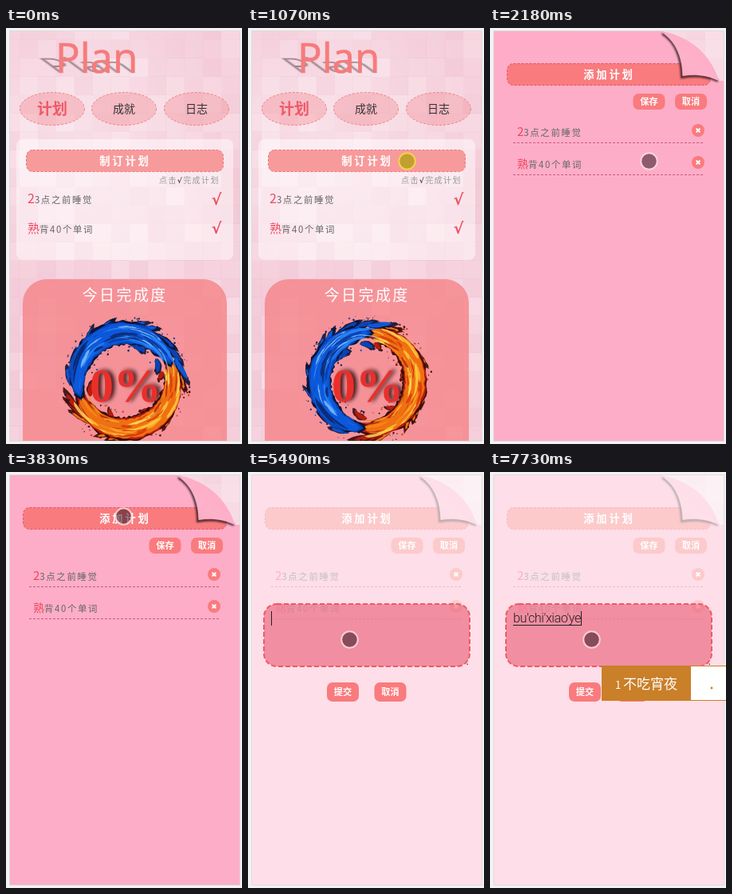
Write an HTML page that moves like this. It is 296 by 520 pixels and loops after 8000 ms.

```html
<!DOCTYPE html>
<html lang="zh">
<head>
<meta charset="utf-8">
<style>
html, body { margin: 0; width: 100%; height: 100%; overflow: hidden; background: #f3f3f3; }
svg { display: block; width: 296px; height: 520px; }
text { font-family: "Noto Sans CJK SC", "Noto Sans CJK", "Open Sans", sans-serif; white-space: pre; }
.pinyin { font: 300 16.3px Roboto, "Open Sans", sans-serif; letter-spacing: -.45px; }
.score { font: bold 60px "Liberation Serif", serif; }
.title { font: 500 51px "Open Sans", "Noto Sans", sans-serif; }
.tick { font-family: "DejaVu Sans", sans-serif; font-weight: 700; }
</style>
</head>
<body>
<svg id="stage" viewBox="0 0 296 520" xmlns="http://www.w3.org/2000/svg"></svg>
<script>
const LOOP = 8000;
const CORAL = '#f97b7e';
const stage = document.getElementById('stage');

let seed = 7;
const rand = (lo = 0, hi = 1) => {
  seed = (seed * 16807) % 2147483647;
  return lo + (hi - lo) * seed / 2147483647;
};

const attrs = o => Object.entries(o).map(([k, v]) => `${k}="${v}"`).join(' ');
const rect = (x, y, w, h, r, fill, more = {}) =>
  `<rect ${attrs({ x, y, width: w, height: h, rx: r, fill, ...more })}/>`;
const label = (s, x, y, size, fill, more = {}) =>
  `<text ${attrs({ x, y, 'font-size': size, fill, ...more })}>${s}</text>`;
// Centred text; the trailing letter space is compensated
const mid = (s, x, y, size, fill, gap = 0, weight = 400) =>
  label(s, x + gap / 2, y, size, fill, { 'text-anchor': 'middle', 'letter-spacing': gap, 'font-weight': weight });

function tiles() {
  const tones = ['#f8dbe4', '#f5cedb', '#f6d3df', '#f3c9d7', '#f9dfe8', '#f5cfdb'];
  let out = rect(5, 4, 288, 512, 0, '#f5cfdc');
  for (let y = -8; y < 520; y += 23)
    for (let x = -6; x < 296; x += 23) {
      const big = rand() < .18 ? 46 : 23;
      const tone = tones[Math.floor(rand() * tones.length)];
      out += rect(x, y, big, 23, 0, tone, { 'fill-opacity': rand(.45, .9).toFixed(2) });
      out += `<path d="M${x} ${y + 22.5}h${big}v-22" fill="none" stroke="#e9b9c9" stroke-opacity="${rand(.05, .35).toFixed(2)}"/>`;
    }
  return out + rect(5, 4, 288, 512, 0, 'url(#glow)');
}

// Ragged crescent between two angles, thin at both ends; drift spirals it outwards
function crescent(a0, a1, inner, outer, fill, rough = 0, opacity = 1, drift = 0) {
  const n = Math.max(8, Math.round(Math.abs(a1 - a0) / 4));
  const centre = (inner + outer) / 2, half = (outer - inner) / 2;
  const edge = side => Array.from({ length: n + 1 }, (_, i) => {
    const u = i / n, a = (a0 + (a1 - a0) * u) * Math.PI / 180;
    const taper = Math.pow(Math.sin(Math.PI * u), .45);
    const r = centre + drift * u * u + side * half * taper + rand(-rough, rough);
    return `${(r * Math.cos(a)).toFixed(1)} ${(r * Math.sin(a)).toFixed(1)}`;
  });
  const points = [...edge(1), ...edge(-1).reverse()];
  return `<path d="M${points.join('L')}Z" fill="${fill}" fill-opacity="${opacity}"/>`;
}

function element(a0, a1, base, streaks, specks) {
  let out = '';
  for (let i = 0; i < 70; i++) {
    const a = rand(a0 - 8, a1 + 8) * Math.PI / 180;
    const r = rand() < .65 ? rand(73, 82) : rand(38, 46);
    out += `<circle cx="${(r * Math.cos(a)).toFixed(1)}" cy="${(r * Math.sin(a)).toFixed(1)}" r="${rand(.4, 1.4).toFixed(1)}" fill="${specks[i % specks.length]}"/>`;
  }
  // Splashes: outer tongues and inner curls
  for (let i = 0; i < 16; i++) {
    const a = rand(a0, a1), sweep = rand(14, 32);
    const outside = i % 4 > 0, r = outside ? 69 : 47;
    const drift = outside ? rand(6, 13) : rand(-9, -4);
    out += crescent(a, a + sweep, r - 4, r + 4, base[0], .7, .9, drift);
    out += crescent(a, a + sweep * .8, r - 3.2, r + 2.8, base[1 + i % 2], .4, 1, drift * .75);
  }
  base.forEach((c, i) => out += crescent(a0 - 10 + i * 4, a1 + 10 - i * 4, 45 + i * 1.6, 75 - i * 1.6, c, 1.8 - i * .4));
  for (let i = 0; i < 48; i++) {
    const start = rand(a0 + 2, a1 - 22), r = rand(49, 69);
    out += crescent(start, start + rand(14, 48), r, r + rand(.8, 4.2), streaks[i % streaks.length], .4, .8, rand(-3, 3));
  }
  return out;
}

function ring() {
  const fire = element(-22, 158, ['#3a0c08', '#b81c0c', '#ee7012'],
    ['#ffb52a', '#ffe268', '#b8200c', '#ffc83c', '#f58a18', '#d8340c'], ['#7d1a10', '#e0451a', '#30100c']);
  const ice = element(-194, -26, ['#0b1538', '#0a44b4', '#0c58da'],
    ['#2f8cff', '#0a3aa4', '#1166e6', '#83c4ff', '#0b4cc4', '#0a2468'], ['#11225a', '#1c2233', '#1a4fae']);
  return fire + ice;
}

const pillButton = (s, x, y, h) =>
  rect(x, y, 40, h, 7, CORAL) + mid(s, x + 20, y + h / 2 + 4, 11.2, '#fff', 0, 700);

const entry = (first, rest, x, y, size) =>
  `<text x="${x}" y="${y}" font-size="11.4" letter-spacing="1.65" fill="#666"><tspan font-size="${size}" letter-spacing="0" fill="#f0455f">${first}</tspan>${rest}</text>`;

const tickMark = y =>
  `<text class="tick" x="264" y="${y}" font-size="19" text-anchor="middle" fill="#ee5060">√</text>`;

function homePage() {
  const tabs = [['计划', 58], ['成就', 148], ['日志', 239]].map(([s, x], i) =>
    `<ellipse cx="${x}" cy="101" rx="40.5" ry="20.5" fill="#f28a92" fill-opacity=".38" stroke="#f28080" stroke-dasharray="3 2"/>` +
    (i ? mid(s, x, 106, 14, '#333') : mid(s, x, 108, 19, '#ee5a68', 0, 700))).join('');
  return `<use href="#tiles"/>
    <g clip-path="url(#card)">
    <text class="title" transform="matrix(1 0 .68 .5 62 56)" fill="#55454c" fill-opacity=".55" filter="url(#soft)">Plan</text>
    <text class="title" x="62" y="55.5" fill="#f67b7b" stroke="#f67b7b" stroke-width=".7">Plan</text>
    ${tabs}
    ${rect(13, 139, 272, 151, 8, '#fff', { 'fill-opacity': .45 })}
    ${rect(25.5, 152.5, 247, 27, 8, '#f79a9b', { stroke: '#e97478', 'stroke-dasharray': '3 2' })}
    ${mid('制订计划', 148, 171, 13.3, '#fff', 2.8, 700)}
    <text x="192" y="194" font-size="10" letter-spacing="1.4" fill="#999">点击<tspan class="tick" font-size="9" fill="#444">√</tspan>完成计划</text>
    ${entry('2', '3点之前睡觉', 27, 219, 16)}
    ${entry('熟', '背40个单词', 27, 256, 15)}
    ${tickMark(221)}${tickMark(257)}
    ${rect(21, 314, 256, 240, 30, '#f6858a', { 'fill-opacity': .82 })}
    ${mid('今日完成度', 148, 340.5, 19, '#fff', 2.4)}
    <g id="ring">${ring()}</g>
    <text class="score" x="105" y="467" fill="#1c0808" fill-opacity=".8" filter="url(#blur)" transform="translate(4 -1)">0%</text>
    <text class="score" x="105" y="467" fill="#ea2f2b">0%</text>
    </g>`;
}

function planPage() {
  const rows = [128, 168].map(y =>
    `<path d="M29 ${y + 15.5}H269" stroke="#d0587a" stroke-dasharray="3 2"/>
     <circle cx="261" cy="${y}" r="8" fill="${CORAL}"/>
     <path d="M258.6 ${y - 2.4}l4.8 4.8m0 -4.8l-4.8 4.8" stroke="#fff" stroke-width="2"/>`).join('');
  return `${rect(5, 4, 288, 512, 0, '#fdadc7')}
    <g clip-path="url(#corner)"><use href="#tiles"/>${rect(210, 4, 83, 64, 0, '#fff', { 'fill-opacity': .2 })}</g>
    ${rect(21.5, 44.5, 255, 27, 8, CORAL, { stroke: '#e5536a', 'stroke-dasharray': '3 2' })}
    ${mid('添加计划', 148, 63, 13.3, '#fff', 2.8, 700)}
    <path d="M216 7C234 18 240.5 40 240.5 61.5C255 58.5 272 60.5 286 66" fill="none" stroke="#2a1a20" stroke-opacity=".85" stroke-width="3" filter="url(#soft)"/>
    <path d="M215 5C235 18 241.5 40 241.5 60C256 57 273 59 287 66C277 33 250 10 215 5Z" fill="url(#flap)"/>
    ${pillButton('保存', 179.5, 82, 20)}${pillButton('取消', 232, 82, 20)}
    ${rows}
    ${entry('2', '3点之前睡觉', 34, 135, 15)}
    ${entry('熟', '背40个单词', 34, 175, 14)}`;
}

function dialog() {
  return `${rect(5, 4, 288, 512, 0, '#fff', { 'fill-opacity': .6 })}
    ${pillButton('提交', 99, 263, 24)}${pillButton('取消', 158.5, 263, 24)}
    ${rect(20, 165, 258, 78, 16, '#ea5a74', { 'fill-opacity': .6, stroke: '#ee5a66', 'stroke-width': 2, 'stroke-dasharray': '6 3' })}
    ${rect(274.5, 239.5, 1.5, 1.5, 0, '#555')}
    <text id="typed" class="pinyin" x="29" y="188" fill="#222"></text>
    <path id="under" stroke="#222"/><path id="caret" stroke="#222"/>
    <g id="choices"></g>`;
}

stage.innerHTML = `<defs>
    <radialGradient id="glow" gradientUnits="userSpaceOnUse" cx="80" cy="130" r="210">
      <stop stop-color="#fff" stop-opacity=".32"/><stop offset="1" stop-color="#fff" stop-opacity="0"/>
    </radialGradient>
    <linearGradient id="flap" x1="0" y1="1" x2="1" y2="0">
      <stop offset=".1" stop-color="#f9a4bf"/><stop offset=".4" stop-color="#fdb2ca"/><stop offset=".75" stop-color="#ffabc6"/>
    </linearGradient>
    <g id="tiles">${tiles()}</g>
    <clipPath id="card">${rect(5, 4, 288, 512, 0, '#000')}</clipPath>
    <clipPath id="corner"><path d="M215 4C250 10 277 33 287 66H293V4Z"/></clipPath>
    <filter id="soft"><feGaussianBlur stdDeviation=".9"/></filter>
    <filter id="blur"><feGaussianBlur stdDeviation="2.6"/></filter>
  </defs>
  ${rect(0, 0, 296, 520, 0, '#f3f3f3')}
  <g clip-path="url(#card)"><g id="home">${homePage()}</g><g id="plan">${planPage()}</g></g>
  ${rect(4.5, 3.5, 289, 513, 0, 'none', { stroke: '#ddd' })}
  <g id="dialog">${dialog()}</g>
  <g id="pointer"><circle id="dot" r="9.5"/><circle id="halo" r="10.3" fill="none" stroke-width="2"/></g>`;

const $ = id => document.getElementById(id);

const spins = [0, 210, 450, 780, 1070, 1370, 1620, 1900];
// time, x, y, pressed
const moves = [
  [780, 199, 166, 0], [1070, 199, 166, 1], [1900, 199, 166, 0],
  [2450, 184, 146, 0], [2710, 162, 114, 0], [2990, 151, 85, 0],
  [3260, 147, 55, 1], [3830, 147, 55, 0], [4380, 130, 155, 0],
  [4660, 128, 203, 0], [4940, 127, 209, 1], [5490, 127, 209, 0]
];
// time, pinyin, left edge of the choices, choices
const keys = [
  [5490, '', 0, []],
  [5770, 'b', 41, ['不', '把', '被', '吧']],
  [6040, 'bu', 41, ['不', '把', '被', '吧']],
  [6330, "bu'c", 66, ['不错', '不成', '不超']],
  [6620, "bu'ch", 66, ['不成', '不超', '不出']],
  [6920, "bu'chi", 66, ['不吃', '不迟', '不持']],
  [7180, "bu'chi'xi", 66, ['不吃系', '不吃']],
  [7460, "bu'chi'xiao'y", 66, ['不吃小鱼', '不吃']],
  [7730, "bu'chi'xiao'ye", 140, ['不吃宵夜']]
];

const latest = (list, t) => list.filter(e => e[0] <= t).pop();
const show = (id, on) => $(id).setAttribute('display', on ? 'inline' : 'none');

function choiceBar(left, words) {
  if (!words.length) return '';
  const orange = '#ca7f29';
  let x = left, out = rect(left, 242, 300 - left, 44, 0, '#fff');
  words.forEach((word, i) => {
    const w = 44 + 17 * word.length;
    if (!i) out += rect(x, 242, w, 44, 0, orange);
    out += label(i + 1, x + 17, 271, 13, i ? '#777' : '#fff');
    out += label(word, x + 27, 271, 17, i ? '#111' : '#fff');
    x += i ? w - 1 : w;
  });
  if (words.length === 1) out += `<circle cx="${x + 26}" cy="270" r="1.4" fill="${orange}"/>`;
  return out + `<path d="M${left} 242.5H296M${left} 285.5H296" stroke="${orange}"/>`;
}

let lastKey;
function drawTyping(key) {
  if (key === lastKey) return;
  lastKey = key;
  const [, text, left, words] = key || [0, '', 0, []];
  $('typed').textContent = text;
  const end = 29 + (text ? $('typed').getComputedTextLength() : 0);
  $('under').setAttribute('d', text ? `M29 191.5H${end}` : '');
  $('caret').setAttribute('d', key ? `M${Math.round(end) + .5} 174V192` : '');
  $('choices').innerHTML = choiceBar(left, words);
}

function draw(t) {
  show('home', t < 2180);
  show('plan', t >= 2180);
  show('dialog', t >= 4120);
  const angle = -.061 * spins.filter(s => s <= t).pop();
  $('ring').setAttribute('transform', `translate(149.5 441) rotate(${angle})`);

  const move = latest(moves, t);
  show('pointer', move);
  if (move) {
    const [, x, y, pressed] = move;
    $('pointer').setAttribute('transform', `translate(${x + .5} ${y + .5})`);
    $('dot').setAttribute('fill', pressed ? '#c0a030' : 'rgba(30,10,20,.5)');
    $('halo').setAttribute('stroke', pressed ? '#f5cf50' : 'rgba(255,222,230,.75)');
  }
  drawTyping(latest(keys, t));
}

const begin = performance.now();
function tick() {
  draw((performance.now() - begin) % LOOP);
  requestAnimationFrame(tick);
}
tick();
</script>
</body>
</html>
```
